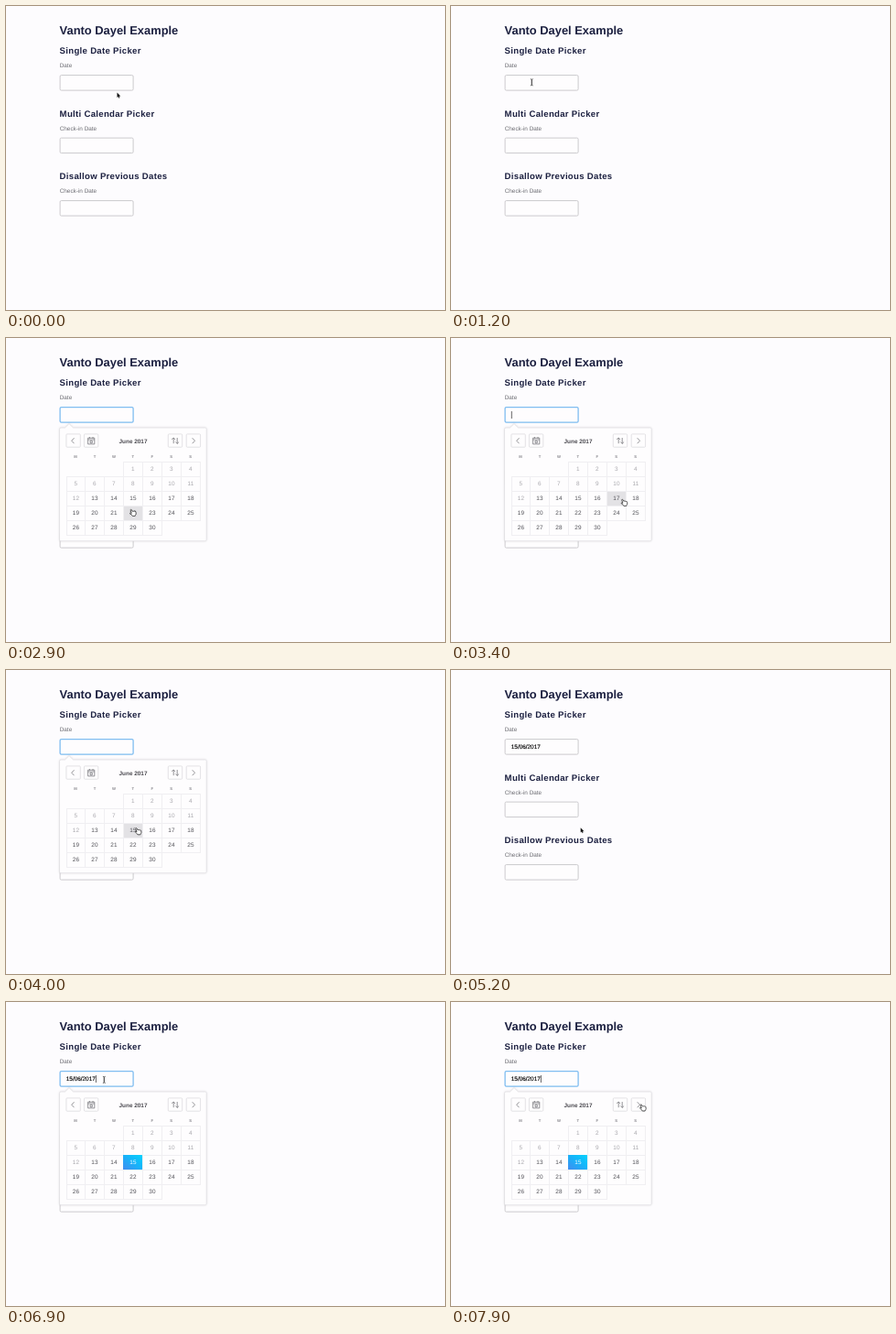
Write an HTML page that moves like this. It is 480 px wide and 332 px high and loops after 8000 ms.

```html
<!DOCTYPE html>
<html lang="en">
<head>
<meta charset="utf-8">
<title>Date picker demo</title>
<style>
  html, body { margin: 0; width: 100%; height: 100%; overflow: hidden; background: #fdfcfe; }
  svg { display: block; width: 480px; height: 332px; }
  text { font: 6.4px "Liberation Sans", Arial, sans-serif; text-rendering: geometricPrecision; fill: #6c6c72; }
  .title { font-size: 12.9px; font-weight: bold; fill: #1c2040; }
  .head { font-size: 9.6px; font-weight: bold; fill: #1c2040; letter-spacing: .3px; }
  .field { fill: #fefdfe; stroke: #cbcacd; }
  .field.focus { stroke: #7fbdf0; stroke-width: 1.3; }
  .value { fill: #000; stroke: #000; stroke-width: .15; }
  .panel { fill: #fefdfe; stroke: #e0dfe3; stroke-width: .8; filter: drop-shadow(0 .5px .8px rgba(0, 0, 0, .1)); }
  .btn { fill: #fefdfe; stroke: #dcdbdf; stroke-width: .8; }
  .icon { fill: none; stroke: #68676d; stroke-width: .7; }
  .month { font-weight: bold; fill: #4a494f; text-anchor: middle; }
  .week { font-size: 4.2px; font-weight: bold; fill: #88878d; text-anchor: middle; }
  .day rect { fill: #fefdfe; stroke: #f0eff2; }
  .day text { fill: #505056; text-anchor: middle; }
  .day.past text { fill: #a9a8ad; }
  .day.hover rect { fill: #e3e2e5; }
  .day.on rect { fill: url(#glow); stroke: url(#glow); }
  .day.on text { fill: #fff; }
  .off { display: none; }
</style>
</head>
<body>
<svg viewBox="0 0 480 332">
  <defs>
    <linearGradient id="glow" x1="0" y1="1" x2="1" y2="0">
      <stop offset="0" stop-color="#428cf0"/>
      <stop offset=".6" stop-color="#12b8fa"/>
      <stop offset="1" stop-color="#08d2fc"/>
    </linearGradient>
  </defs>
  <text class="title" x="58.6" y="31.4">Vanto Dayel Example</text>
  <g id="form"></g>
  <text id="value" class="value" x="65.8" y="85.9">15/06/2017</text>
  <path id="caret" d="M0 80V88" stroke="#222" stroke-width=".7"/>
  <g id="popup">
    <path class="panel" d="M60 98H64.5L69 93.6L73.5 98H217.7Q219.2 98 219.2 99.5V220.2Q219.2 221.7 217.7 221.7H60Q58.5 221.7 58.5 220.2V99.5Q58.5 98 60 98Z"/>
    <g id="buttons"></g>
    <g class="icon">
      <path d="M74.5 109.2L71.7 112.2L74.5 115.2"/>
      <path d="M89.6 109.2H96.8V115.9H89.6ZM89.6 111H96.8M91.4 108V109.6M95 108V109.6M92 112.4H94.4V114.5H92Z"/>
      <path d="M183.2 115.2V109M181.3 110.9L183.2 109L185.1 110.9M187.2 109V115.4M185.3 113.5L187.2 115.4L189.1 113.5"/>
      <path d="M203.7 109.2L206.5 112.2L203.7 115.2"/>
    </g>
    <text class="month" x="139" y="114.6">June 2017</text>
    <g id="days"></g>
  </g>
  <g id="cursor">
    <path id="arrow" d="M0 0V5.4L1.2 4.3L2 6.1L2.8 5.7L2.1 4H3.8Z" fill="#111"/>
    <path id="beam" d="M-1.4 -3.6Q0 -3.6 0 -2.6V2.6Q0 3.6 -1.4 3.6M1.4 -3.6Q0 -3.6 0 -2.6V2.6Q0 3.6 1.4 3.6" fill="none" stroke="#333" stroke-width=".7"/>
    <path id="hand" d="M-.9 .8Q-.4 -.4 .4 .6L1.3 2.4Q2 1.6 2.6 2.3Q3.4 1.7 3.9 2.5Q4.8 2.2 5 3.2L5.2 5Q5 6 4.4 6.6L4.2 7.4H1.3L.9 6.6L-1.5 4.5Q-1.5 3.6 -.4 4L.3 4.4Z" fill="#fff" stroke="#222" stroke-width=".75" stroke-linejoin="round"/>
  </g>
</svg>
<script>
  const LOOP = 8000, STEP = 100;
  const OPEN = 1400, PICK = 4600, CLOSE = 4700, REOPEN = 6900;
  const $ = id => document.getElementById(id);

  function add(parent, tag, attrs, text) {
    const el = document.createElementNS("http://www.w3.org/2000/svg", tag);
    for (const k in attrs) el.setAttribute(k, attrs[k]);
    if (text !== undefined) el.textContent = text;
    return parent.appendChild(el);
  }

  const box = (x, y, width, height) => ({ x, y, width, height });
  const inside = (b, x, y) => x >= b.x && x < b.x + b.width && y >= b.y && y < b.y + b.height;
  const show = (el, on) => el.classList.toggle("off", !on);

  const fields = [
    ["Single Date Picker", "Date"],
    ["Multi Calendar Picker", "Check-in Date"],
    ["Disallow Previous Dates", "Check-in Date"]
  ].map(([head, label], i) => {
    const y = i * 68.5, b = box(59.1, 75.6 + y, 80, 16.5);
    add($("form"), "text", { class: "head", x: 58.6, y: 52 + y }, head);
    add($("form"), "text", { x: 58.7, y: 67.2 + y }, label);
    return { b, el: add($("form"), "rect", { class: "field", rx: 1.4, ...b }) };
  });

  const buttons = [65.9, 85.4, 177.3, 197.2].map(x => {
    const b = box(x, 104.9, 15.4, 14.3);
    add($("buttons"), "rect", { class: "btn", rx: 1, ...b });
    return b;
  });

  const colX = c => Math.round(65.5 + 20.9 * c);
  [..."MTWTFSS"].forEach((s, c) =>
    add($("days"), "text", { class: "week", x: 76 + 20.95 * c, y: 130.5 }, s));

  // The month starts on a Thursday
  const days = Array.from({ length: 30 }, (_, i) => {
    const c = (i + 3) % 7, r = Math.floor((i + 3) / 7);
    const x = colX(c), y = 135 + 16 * r, w = colX(c + 1) - x;
    const el = add($("days"), "g", { class: i < 12 ? "day past" : "day" });
    add(el, "rect", box(x + .5, y + .5, w, 16));
    add(el, "text", { x: x + w / 2 + .4, y: y + 10.2 }, i + 1);
    return { n: i + 1, b: box(x, y, w, 16), el };
  });

  // Pointer moves; each starts where the last one ended
  const home = { x: 121.5, y: 94.6 };
  const moves = [
    { from: 200, to: 500, x: 101, y: 89.3 },
    { from: 900, to: 1200, x: 88.3, y: 83.3 },
    { from: 2000, to: 2200, x: 90.2, y: 125.8 },
    { from: 2200, to: 2400, x: 97, y: 157 },
    { from: 2500, to: 2900, x: 137, y: 187 },
    { from: 2900, to: 3400, x: 187.6, y: 176 },
    { from: 3400, to: 4100, x: 142.2, y: 172.4 },
    { from: 5100, to: 5800, x: 99.5, y: 150.6 },
    { from: 6000, to: 6700, x: 107.3, y: 84.9 },
    { from: 6900, to: 7400, x: 140, y: 172 },
    { from: 7400, to: 7900, x: 208, y: 111.6 }
  ];

  const ease = k => k < .5 ? 4 * k ** 3 : 1 - 4 * (1 - k) ** 3;

  function pointAt(t) {
    let { x, y } = home;
    for (const m of moves) {
      if (t <= m.from) break;
      const k = ease(Math.min(1, (t - m.from) / (m.to - m.from)));
      x += (m.x - x) * k;
      y += (m.y - y) * k;
    }
    return [x, y];
  }

  function draw(now) {
    const t = Math.floor((now % LOOP) / STEP) * STEP;
    const [x, y] = pointAt(t);
    const open = t >= REOPEN || (t >= OPEN && t < CLOSE);
    const openedAt = t >= REOPEN ? REOPEN : OPEN;
    const filled = t >= PICK;

    show($("popup"), open);
    show($("value"), filled);
    fields[0].el.classList.toggle("focus", open);
    show($("caret"), open && (t - openedAt) % 1000 < 500);
    $("caret").setAttribute("transform", `translate(${filled ? 98.4 : 66.3} 0)`);

    let kind = "arrow";
    if (fields.some((f, i) => (!i || !open) && inside(f.b, x, y))) kind = "beam";
    if (open && buttons.some(b => inside(b, x, y))) kind = "hand";
    for (const d of days) {
      const over = open && inside(d.b, x, y), on = filled && d.n === 15;
      if (over) kind = "hand";
      d.el.classList.toggle("hover", over && !on);
      d.el.classList.toggle("on", on);
    }
    for (const id of ["arrow", "beam", "hand"]) show($(id), id === kind);
    $("cursor").setAttribute("transform", `translate(${x} ${y})`);
  }

  const start = performance.now();
  function tick() {
    draw(performance.now() - start);
    requestAnimationFrame(tick);
  }
  tick();
</script>
</body>
</html>
```
